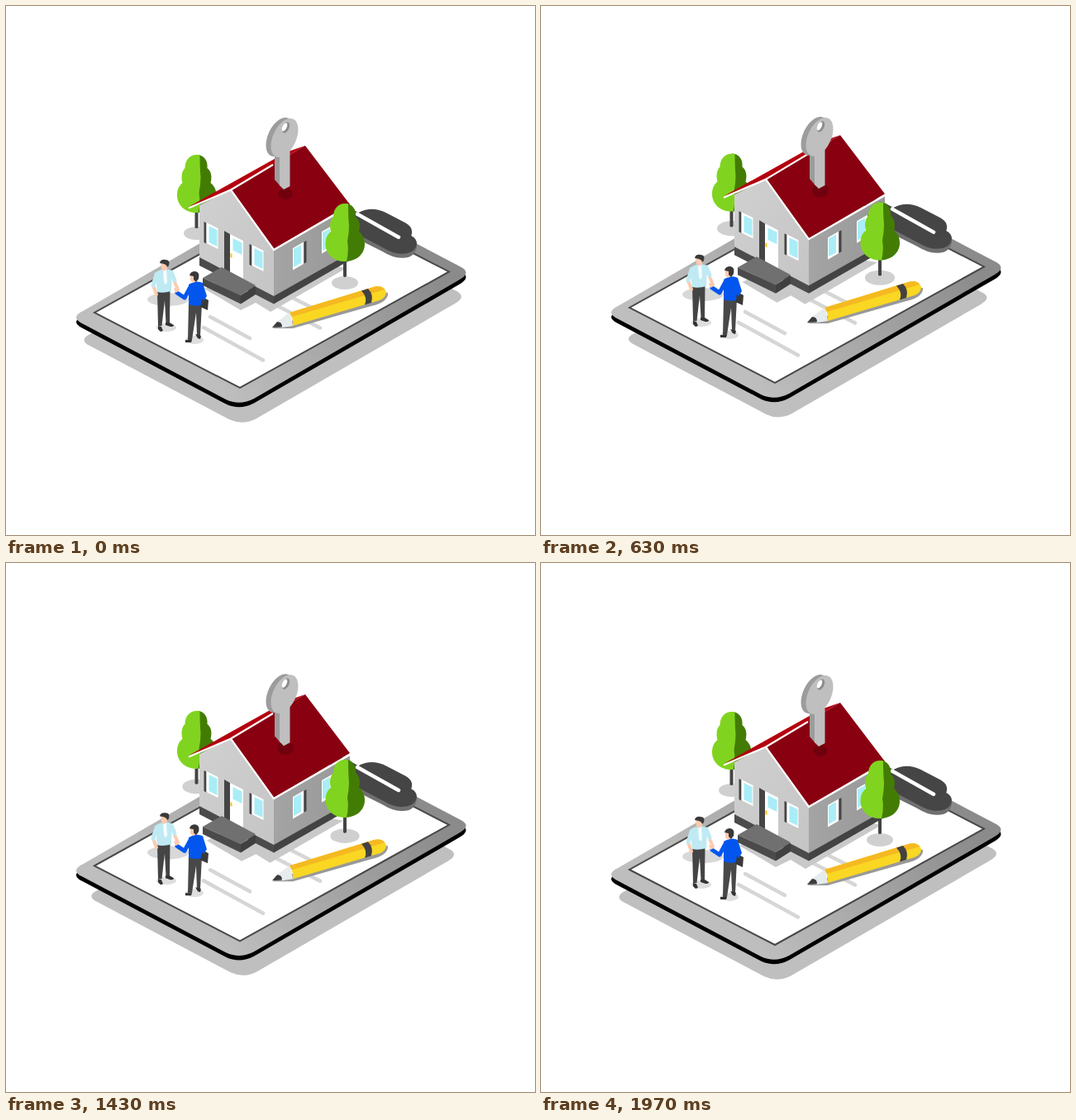
Animation, 640 px wide and 640 px high, one loop 2.01 s. Source, as an HTML page:

```html
<!DOCTYPE html>
<html lang="en">
<head>
<meta charset="utf-8">
<title>House on a tablet</title>
<style>
html, body { margin: 0; width: 100%; height: 100%; overflow: hidden; background: #fff; }
svg { display: block; width: 100%; height: 100%; }
</style>
</head>
<body>
<svg viewBox="0 0 640 640">
<defs>
  <linearGradient id="metal" gradientUnits="userSpaceOnUse" x1="275" y1="480" x2="470" y2="275">
    <stop stop-color="#bebebe"/><stop offset="1" stop-color="#8b8b8b"/>
  </linearGradient>
  <linearGradient id="front" x1="0" y1="0" x2="1" y2="1">
    <stop stop-color="#d0d0d0"/><stop offset="1" stop-color="#c5c5c5"/>
  </linearGradient>
  <linearGradient id="side">
    <stop stop-color="#a4a4a4"/><stop offset="1" stop-color="#989898"/>
  </linearGradient>
  <path id="slab" d="M94 368.500Q77 376.500 92 384L266 476Q283 484 300 475L548 331.500Q565 322 548 314.500L359 215Z"/>
  <g id="tree">
    <path d="M-2 60h4v28q-2 2-4 0z" fill="#444"/>
    <path fill="#437c04" d="M0 0C9 0 14 7 13 16C18 20 19 27 17 34C22 38 24 43 24 49C24 62 13 70 0 70Z"/>
    <path fill="#80d41f" d="M4 .6C-7-2-14 6-14 16C-18 20-19 27-17 34C-21 37-23.5 42-23.5 49C-23.5 62-12 71 2 70Q5 58 3 46Q5 36 5 27Q4 16 4 .6Z"/>
  </g>
  <g id="frontWin">
    <path fill="#454545" d="M-4-1l3 1.500v25l-3-1.500z"/>
    <path fill="#fff" d="M-1 0L13 7V32L-1 25Z"/>
    <path fill="#a9edf7" d="M2 4L12 9V29L2 24Z"/>
  </g>
  <g id="sideWin">
    <path fill="#454545" d="M13.500-7.500l3-1.500v26l-3 1.500z"/>
    <path fill="#fff" d="M0 0L13-7.500V19L0 26.500Z"/>
    <path fill="#a9edf7" d="M1 1L10-4V18L1 23Z"/>
  </g>
  <ellipse id="dot" rx="16" ry="8" fill="#d0d0d0"/>
</defs>

<!-- data-m: vertical travel, growth, growth centre x, y -->
<g data-m="0 -.068 322 378">
  <use href="#slab" fill="#bfbfbf" transform="translate(322 503.500) scale(.968) translate(-320 -479.500)"/>
</g>
<g data-m="-8 .18 231 275"><use href="#dot" x="231" y="275"/></g>
<g data-m="-2"><use href="#tree" x="230.500" y="180"/></g>

<g data-m="-8.200">
  <use href="#slab" y="5.500"/>
  <use href="#slab" fill="url(#metal)"/>
  <path d="M107 371L283 462L536 321.500L360 230.500Z" fill="#fff" stroke="#484848" stroke-width="2"/>
  <g transform="translate(0 .7)">
    <path d="M415 249L470 280Q497 279 497 291Q494 305 478 304Q468 304 455 296L415 276Z" fill="#707070"/>
    <path d="M415 243L470 274Q497 274 497 287Q495 299 478 299Q468 299 455 291L415 270Z" fill="#464646"/>
    <path d="M427 249Q442 241 459 249L484 262Q494 268 490 278L480 284L427 254Z" fill="#454545"/>
    <path d="M425 251L475 279" stroke="#fff" stroke-width="4.500" stroke-linecap="round"/>
  </g>
  <g stroke="#d6d6d6" stroke-width="4.500" stroke-linecap="round">
    <path d="M247 376L295 402M239 389L311 428.500M298 347L380 389.500M325 342L372 366"/>
  </g>
</g>

<g data-m="-8.500 -.07 310 310">
  <path d="M240 342L284 368L302 359L320 370L412 317L324 300Z" fill="#c9c9c9"/>
</g>

<g data-m="-8.200">
  <path d="M322 390L347 390L442 363Q463 358 462 347L440 345Z" fill="#999"/>
  <path d="M328 382L344 370L347 387L334 389Z" fill="#e6ebee"/>
  <path d="M322 389L328 382Q334 382 334 388Z" fill="#3c3c3c"/>
  <path d="M343 371L446 339.500Q457 337 460 346Q460 353 452 356L347 387Q348 378 343 371Z" fill="#f9d723"/>
  <path d="M343 371L446 339.500Q455 338 458 343L346 376Z" fill="#f5b921"/>
  <path d="M430 344.500L438 342Q445 349 442 359L434 361.500Q438 353 430 344.500Z" fill="#424242"/>
  <ellipse cx="196" cy="355" rx="25" ry="8" fill="#d8d8d8"/>
  <ellipse cx="194" cy="389" rx="12" ry="5" fill="#dedede"/>
  <ellipse cx="228" cy="404" rx="11" ry="5" fill="#dedede"/>
  <!-- man in the light shirt -->
  <g fill="#444">
    <path d="M183 345L198.500 344L198 384H193.500L192 356L188.500 387H184Z"/>
    <path d="M184 387L188 388L190 393L187 394L184 391ZM193 383L198 383L203 386Q203 388 199 388L193 386Z" fill="#333"/>
  </g>
  <g fill="none" stroke-linecap="round" stroke-width="4">
    <path d="M178 338L182 349M204 334L208 343" stroke="#fbcbb0"/>
    <path d="M182 325L178 338M200 322L204 332" stroke="#bfeaf3" stroke-width="5"/>
  </g>
  <path d="M180 323Q190 316 201 320L200 345Q190 348 183 346Z" fill="#bfeaf3"/>
  <path d="M190 319h4l1 15-2 3-2-3z" fill="#f5fcff"/>
  <path d="M187 310Q192 307 196 312L195 318L191 321L188 318Z" fill="#fbcbb0"/>
  <path d="M186 311Q187 306 193 307Q199 307 197 314L195 316Q195 312 186 311Z" fill="#393939"/>
  <!-- man in the blue jumper -->
  <g fill="#484848">
    <path d="M221 360L237 360L235 399H231L230 371L225 404H220Z"/>
    <path d="M217 404L225 404L224 407L217 407ZM229 397L236 399L235 403L232 402Z" fill="#333"/>
  </g>
  <path d="M236 351L245 356L244 368L235 364Z" fill="#393939"/>
  <path d="M223 340L216 353L207 347" fill="none" stroke="#0256ee" stroke-width="5" stroke-linecap="round" stroke-linejoin="round"/>
  <path d="M203 342Q206 339 209 345L205 347Z" fill="#fbcbb0"/>
  <path d="M221 337Q230 331 238 335L243 351L239 357L237 354L236 362Q228 364 221 361Z" fill="#0256ee"/>
  <path d="M223 326L230 326L230 333L226 335L223 332Z" fill="#fbcbb0"/>
  <path d="M222 326Q223 321 229 321Q235 322 233 330L230 334L227 331L227 327Z" fill="#393939"/>
</g>

<g data-m="-17.400">
  <path d="M234 241L272 222L324 295V352L234 305Z" fill="url(#front)"/>
  <path d="M324 295L416 243V300L324 352Z" fill="url(#side)"/>
  <path d="M234 304L324 351V360.500L234 314Z" fill="#4b4b4b"/>
  <path d="M324 351L416 299V307.500L324 360.500Z" fill="#434343"/>
  <use href="#frontWin" x="243.500" y="262"/>
  <use href="#frontWin" x="298.500" y="289"/>
  <use href="#sideWin" x="347" y="293"/>
  <use href="#sideWin" x="382" y="273"/>
  <path d="M264 272L271 276V324L264 321Z" fill="#454545"/>
  <path d="M271 276L287 284V333L271 325Z" fill="#fff"/>
  <path d="M274.500 281L285.500 286.500V301L274.500 295.500Z" fill="#a9edf7"/>
  <path d="M271.500 299l2 1v5l-2-1z" fill="#f3c623"/>
  <path d="M238 329L261 316L302 338L284 350Z" fill="#707070"/>
  <path d="M238 329L284 350V360.500L238 338Z" fill="#4a4a4a"/>
  <path d="M284 350L302 339V349L284 360.500Z" fill="#404040"/>
  <path d="M220 243.500L340 176.500L362 169L272 222Z" fill="#b4000f"/>
  <path d="M272 222L362 169L416 240L324 294Z" fill="#890011"/>
  <path d="M221 244.500L272 222.500L324 295L416 242M272 222.500L323 192" fill="none" stroke="#fff" stroke-width="2.200"/>
</g>

<g data-m="-5.500 .28 338 227"><ellipse cx="338" cy="227" rx="8.500" ry="7" fill="#70000e"/></g>
<g data-m="-1.500">
  <g fill="#9c9c9c">
    <ellipse rx="14" ry="25" transform="translate(331 158.500) rotate(25)"/>
    <path d="M325 176L332 178V218L325 210Z"/>
  </g>
  <g fill="#bfbfbf">
    <ellipse rx="14" ry="25" transform="translate(337 159.500) rotate(25)"/>
    <path d="M331 176L343.500 172V218L336 222L331 217Z"/>
  </g>
  <ellipse rx="4" ry="7" transform="translate(338.500 147) rotate(25)" fill="#8c8c8c"/>
  <ellipse rx="2.600" ry="5.500" transform="translate(337 146.500) rotate(25)" fill="#fff"/>
</g>

<g data-m="-8.500 .18 410 335"><use href="#dot" x="410" y="335"/></g>
<g data-m="-2"><use href="#tree" x="410" y="239"/></g>
</svg>
<script>
const LOOP = 2010, LEAD = 30;
const parts = [...document.querySelectorAll("[data-m]")].map(el => {
  const [dy, grow = 0, cx = 0, cy = 0] = el.dataset.m.split(" ").map(Number);
  return { el, dy, grow, cx, cy };
});

function draw(now) {
  const lift = (1 - Math.cos((now + LEAD) / LOOP * 2 * Math.PI)) / 2;
  for (const { el, dy, grow, cx, cy } of parts) {
    const s = 1 + grow * lift;
    el.setAttribute("transform", `translate(${cx} ${cy + dy * lift}) scale(${s}) translate(${-cx} ${-cy})`);
  }
}

const start = performance.now();
function tick() {
  draw(performance.now() - start);
  requestAnimationFrame(tick);
}
tick();
</script>
</body>
</html>
```
